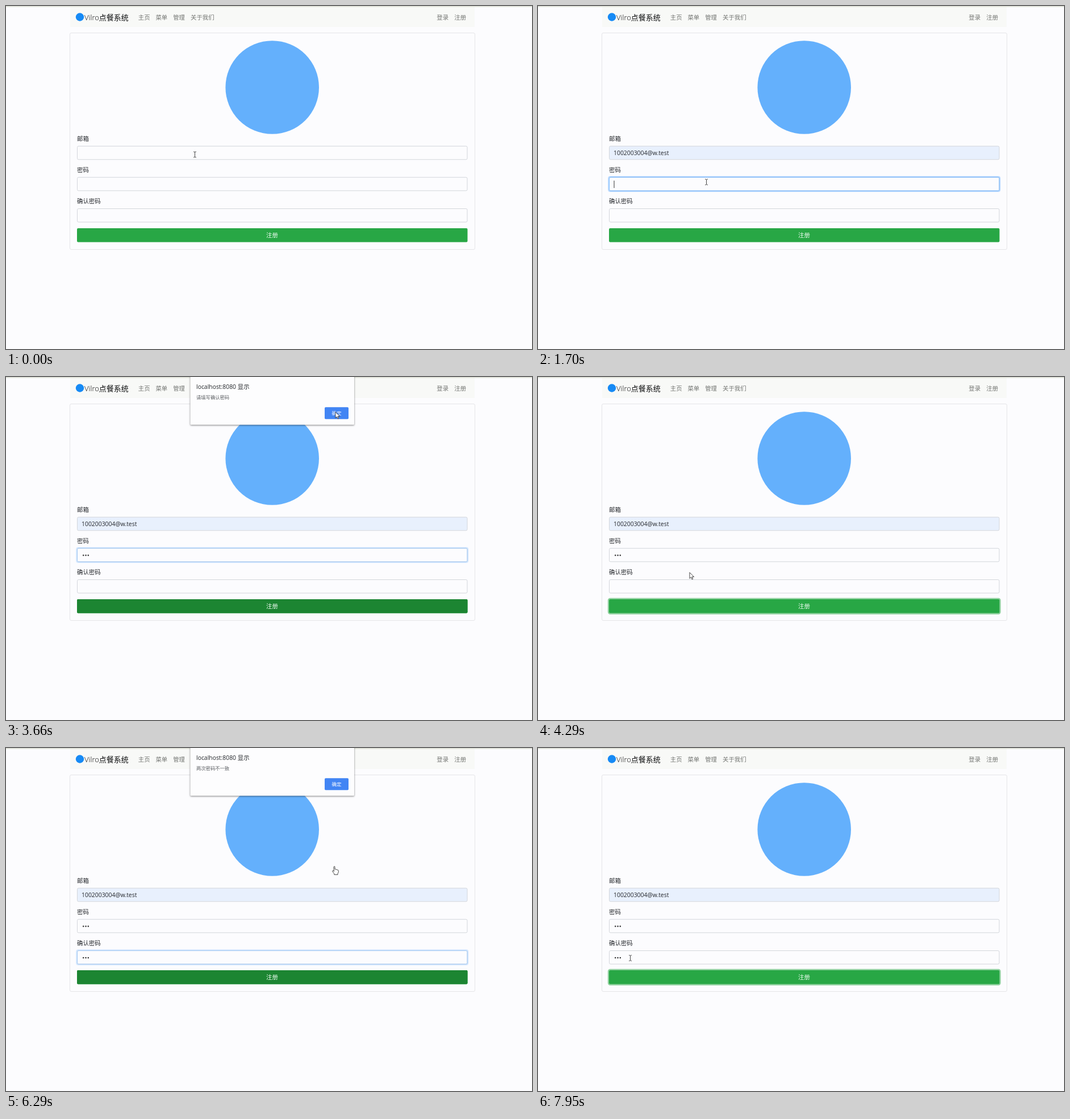
Recreate the animation shown at these times as an HTML page. Size 926 by 605 pixels, loop 8 s.

```html
<!DOCTYPE html>
<html lang="zh-CN">
<head>
<meta charset="utf-8">
<title>注册</title>
<style>
  html, body { margin: 0; width: 100%; height: 100%; overflow: hidden; background: #fcfcfe; }
  svg { display: block; width: 926px; height: 605px; }
  text { font: 10.4px "Open Sans", "Noto Sans CJK SC", "Noto Sans CJK", sans-serif; fill: #24272b; }
  .nav text { font-weight: 300; fill: #737572; }
  .nav .brand { font-size: 13px; fill: #0c0d0e; }
  .box { fill: #fcfcfe; stroke: #d3d6db; }
  .ring { fill: none; stroke: #007bff; stroke-opacity: .27; stroke-width: 2; }
  .edge { fill: none; stroke: #80bdff; }
  .caret { stroke: #333; }
  .dialog .message { font-size: 8.3px; fill: #5c5f63; }
  .dialog .ok { font-size: 8.5px; font-weight: 500; fill: #fff; }
  .cursor path { fill: #fff; stroke: #333; stroke-width: .9; stroke-linejoin: round; stroke-linecap: round; }
  #panel { filter: drop-shadow(0 1px 1.5px rgba(0, 0, 0, .5)); }
</style>
</head>
<body>
<svg viewBox="0 0 926 605">
  <rect width="926" height="605" fill="#fcfcfe"/>
  <rect x="113" y="1" width="712" height="36" fill="#f8f9f7"/>
  <rect width="926" height="1.7" fill="#dfe1d8"/>
  <g class="nav">
    <circle cx="130" cy="19.5" r="7.2" fill="#168af5"/>
    <text class="brand" x="138" y="24.7">Vilro点餐系统</text>
    <text x="232.8" y="23.7">主页</text>
    <text x="263.4" y="23.7">菜单</text>
    <text x="294.2" y="23.7">管理</text>
    <text x="325" y="23.7">关于我们</text>
    <text x="758.3" y="23.7">登录</text>
    <text x="789.3" y="23.7">注册</text>
  </g>
  <rect x="112.5" y="47.5" width="713" height="382" rx="2.5" fill="none" stroke="#e5e5e8"/>
  <circle cx="468.7" cy="143.5" r="82.3" fill="#64b0fc"/>
  <g id="fields"></g>
  <rect id="buttonRing" x="124" y="391" width="689.5" height="26.5" rx="3" fill="none" stroke="#28a745" stroke-opacity=".5" stroke-width="2.4"/>
  <rect x="125" y="392" width="687.5" height="24.5" rx="2" fill="#28a745"/>
  <rect id="buttonHover" x="125" y="392" width="687.5" height="24.5" rx="2" fill="#1c8532"/>
  <text x="468.5" y="408.3" text-anchor="middle" style="fill:#eefbf1">注册</text>
  <g id="dialog" class="dialog">
    <rect id="panel" x="324.5" y="-12" width="288.5" height="96.3" rx="1.5" fill="#fdfdfe"/>
    <text x="335" y="20.5">localhost:8080 显示</text>
    <text id="message" class="message" x="335" y="39"></text>
    <rect x="561" y="53.3" width="42" height="21" rx="1.8" fill="#4285f4"/>
    <text class="ok" x="582" y="67.2" text-anchor="middle">确定</text>
  </g>
  <g id="cursor" class="cursor">
    <path id="arrow" d="M0 0V10.2L2.5 8L4.2 11.8L5.8 11.1L4.2 7.4H7.3Z"/>
    <path id="ibeam" d="M-2-5Q0-5 0-4Q0-5 2-5M0-4V4M-2 5Q0 5 0 4Q0 5 2 5" style="fill:none"/>
    <path id="hand" d="M-.9 1Q0-.5 1 1V5.5Q2.3 4.8 3 6Q4.3 5.5 5 6.7Q7 6.2 7.2 8V11L6 13V15H-.2V13.3L-3.2 9.5Q-3.6 7.6-1.8 8L-.9 9Z"/>
  </g>
</svg>
<script>
const LOOP = 8000;
const $ = id => document.getElementById(id);

// time, hotspot x, y, pointer shape from here on
const path = [
  [0, 332.5, 262, 'ibeam'], [700, 332.5, 262, 'ibeam'], [1000, 325, 285, 'arrow'],
  [1290, 322, 288, 'arrow'], [1420, 296.5, 310.5, 'ibeam'], [1950, 296.5, 310.5, 'ibeam'],
  [2080, 303, 342, 'arrow'], [2250, 333, 396, 'hand'], [2740, 334, 396, 'hand'],
  [2790, 334, 388, 'hand'], [2910, 405, 328, 'hand'], [3200, 560, 88, 'arrow'],
  [3350, 580, 62, 'arrow'], [3860, 580, 62, 'arrow'], [4290, 267, 345, 'arrow'],
  [4480, 255.5, 369.5, 'ibeam'], [5430, 255.5, 369.5, 'ibeam'], [5700, 330, 400, 'hand'],
  [6060, 335, 400, 'hand'], [6250, 560, 245, 'hand'], [6290, 578, 209, 'hand'],
  [6480, 580, 88, 'arrow'], [6560, 580, 62, 'arrow'], [7230, 580, 62, 'arrow'],
  [7600, 265, 325, 'arrow'], [7800, 162.5, 370.5, 'ibeam'], [LOOP, 162.5, 370.5, 'ibeam']
];

// level steps: [start time, value, duration]
const fields = [
  { label: '邮箱', y: 247, steps: [[450, 1, 150], [1420, 0, 150]],
    active: [450, 1420], keys: [], filled: 1000 },
  { label: '密码', y: 302, steps: [[1420, 1, 150], [2700, .6, 60], [3870, 0, 100]],
    active: [1420, 2650], keys: [1800, 1900, 2020] },
  { label: '确认密码', y: 357.3, steps: [[4600, 1, 150], [6050, .6, 60], [7240, 0, 100]],
    active: [4600, 6000], keys: [4880, 5080, 5260] }
];
const hover = [[2220, 1, 150], [3870, 0, 150], [5670, 1, 150], [7240, 0, 150]];
const ring = [[3870, 1, 150], [4600, 0, 150], [7240, 1, 150]];
const dialog = [[2700, 1, 160], [3860, 0, 120], [6040, 1, 160], [7230, 0, 120]];

fields.forEach((f, i) => {
  const dots = f.keys.map((_, k) =>
    `<circle cx="${136.2 + 4.3 * k}" cy="${f.y + 12.6}" r="1.25" fill="#333"/>`).join('');
  $('fields').insertAdjacentHTML('beforeend', `<g>
    <text x="125" y="${f.y - 9.1}">${f.label}</text>
    <rect class="box" x="125.5" y="${f.y + .2}" width="686.5" height="23.6" rx="2.2"/>
    <g class="focus"><rect class="ring" x="124.2" y="${f.y - 1}" width="689" height="26" rx="3"/>
    <rect class="edge" x="125.5" y="${f.y + .2}" width="686.5" height="23.6" rx="2.2"/></g>
    ${f.filled ? `<text class="value" x="133" y="${f.y + 15.7}">1002003004@w.test</text>` : ''}
    <g class="dots">${dots}</g>
    <path class="caret" d="M0 ${f.y + 6}v13"/></g>`);
  const group = $('fields').children[i];
  for (const part of ['box', 'focus', 'value', 'dots', 'caret']) f[part] = group.querySelector('.' + part);
});

const clamp = v => Math.max(0, Math.min(1, v));
const show = (el, on) => el.style.visibility = on ? 'visible' : 'hidden';

function level(steps, t) {
  let v = 0;
  for (const [start, to, time] of steps) v += (to - v) * clamp((t - start) / time);
  return v;
}

function drawField(f, t) {
  f.focus.setAttribute('opacity', level(f.steps, t));
  const typed = f.keys.filter(k => t >= k).length;
  [...f.dots.children].forEach((dot, k) => show(dot, k < typed));
  const filled = f.filled && t >= f.filled;
  if (f.value) {
    show(f.value, filled);
    f.box.style.fill = filled ? '#e8f0fd' : '';
  }
  const [from, to] = f.active;
  const last = filled ? f.filled : typed ? f.keys[typed - 1] : from;
  show(f.caret, t >= from && t < to && (t - last) % 1000 < 500);
  f.caret.setAttribute('transform', `translate(${filled ? 234.5 : 134 + 4.5 * typed} 0)`);
}

function drawCursor(t) {
  const i = path.findIndex(p => p[0] > t);
  const [t0, x0, y0, shape] = path[i - 1], [t1, x1, y1] = path[i];
  const u = (t - t0) / (t1 - t0);
  $('cursor').setAttribute('transform', `translate(${x0 + (x1 - x0) * u} ${y0 + (y1 - y0) * u})`);
  for (const id of ['arrow', 'ibeam', 'hand']) show($(id), id === shape);
}

function draw(t) {
  fields.forEach(f => drawField(f, t));
  $('buttonHover').setAttribute('opacity', level(hover, t));
  $('buttonRing').setAttribute('opacity', level(ring, t));
  const open = level(dialog, t);
  $('dialog').setAttribute('opacity', open);
  $('dialog').setAttribute('transform', `translate(0 ${-16 * (1 - open)})`);
  $('message').textContent = t < 5000 ? '请填写确认密码' : '两次密码不一致';
  drawCursor(t);
}

const begin = performance.now();
function tick() {
  draw((performance.now() - begin) % LOOP);
  requestAnimationFrame(tick);
}
tick();
</script>
</body>
</html>
```
